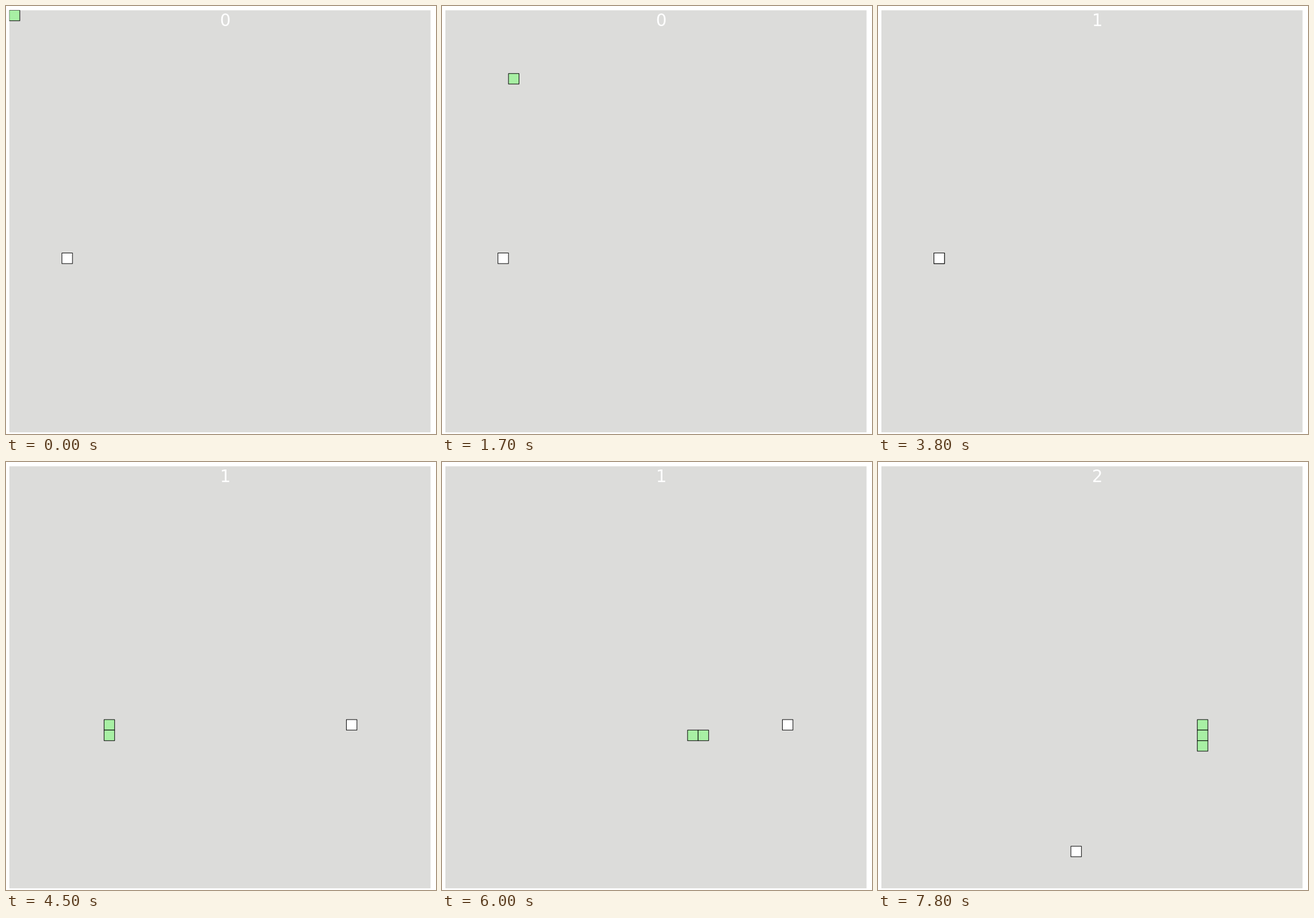
Write an HTML page with a canvas that moves like this. It is 751 px wide and 746 px high and loops after 8 s.

```html
<!DOCTYPE html>
<html lang="en">
<head>
<meta charset="utf-8">
<title>Snake</title>
<style>
  html, body { margin: 0; width: 100%; height: 100%; overflow: hidden; background: #fff; }
  canvas { display: block; }
</style>
</head>
<body>
<canvas width="751" height="746"></canvas>
<script>
const ctx = document.querySelector('canvas').getContext('2d');
const CELL = 20, FIELD = 800, LOOP = 8000;
const DIRS = { R: [1, 0], L: [-1, 0], U: [0, -1], D: [0, 1] };
const FOODS = [[5, 23], [32, 24], [18, 36]];
const MEALS = [34, 64]; // move counts at which the head reaches food

// Every cell the head visits, from runs of equal moves
const path = [[0, 0]];
for (const run of 'R6 D7 L3 D16 R6 D2 R23 U4 L2 D5'.split(' ')) {
  const [dx, dy] = DIRS[run[0]];
  for (let i = +run.slice(1); i > 0; i--) {
    const [x, y] = path[path.length - 1];
    path.push([x + dx, y + dy]);
  }
}

function drawCell([x, y], color) {
  ctx.fillStyle = color;
  ctx.beginPath();
  ctx.rect(x * CELL, y * CELL, CELL, CELL);
  ctx.fill();
  ctx.stroke();
}

function draw(time) {
  const tick = Math.max(0, Math.floor(time / 100) - 5);
  // Each fourth step of five makes two moves, then the snake rests
  const moves = tick + (tick % 5 === 3 ? 1 : 0);
  const score = MEALS.filter(m => moves >= m).length;
  const grown = MEALS.filter(m => moves > m).length;
  const food = FOODS[MEALS.filter(m => tick >= m).length];

  ctx.setTransform(1, 0, 0, 1, 0, 0);
  ctx.fillStyle = '#fff';
  ctx.fillRect(0, 0, 751, 746);

  ctx.save();
  ctx.setTransform(0.92, 0, 0, 0.92, 5.7, 7.3);
  ctx.beginPath();
  ctx.rect(0, 0, FIELD, FIELD);
  ctx.clip();
  ctx.fillStyle = '#dcdcda';
  ctx.fillRect(0, 0, FIELD, FIELD);

  ctx.fillStyle = '#fff';
  ctx.font = '32px "DejaVu Sans", sans-serif';
  ctx.fillText(score, FIELD / 2, 30);

  ctx.strokeStyle = '#000';
  ctx.lineWidth = 1.1;
  ctx.lineJoin = 'round';
  for (let i = moves - grown; i <= moves; i++) drawCell(path[i], '#a8f0a4');
  drawCell(food, '#fff');
  ctx.restore();
}

const start = performance.now();
function frame() {
  draw((performance.now() - start) % LOOP);
  requestAnimationFrame(frame);
}
frame();
</script>
</body>
</html>
```
